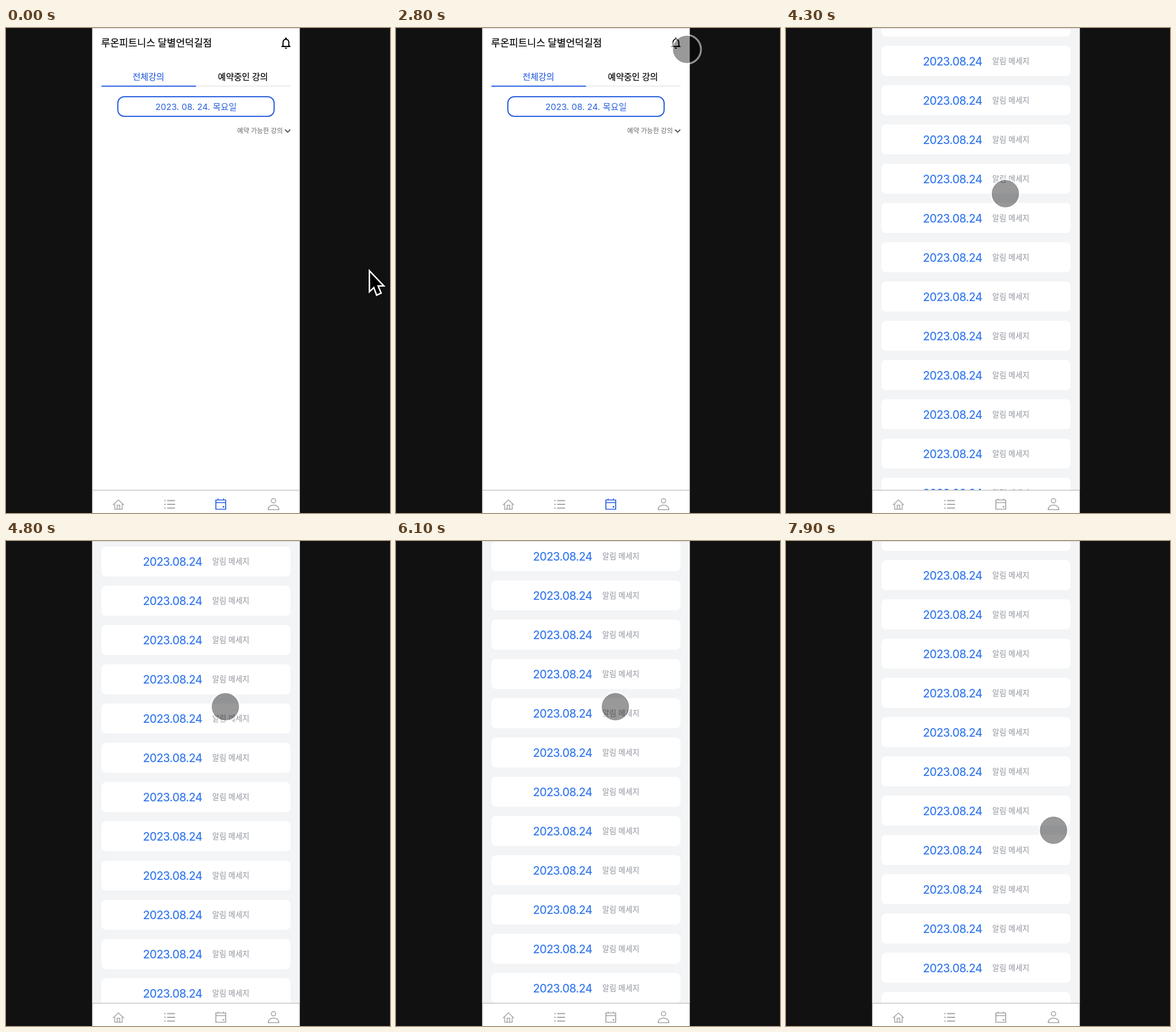
Write an HTML page that moves like this. It is 666 px wide and 840 px high and loops after 8000 ms.

```html
<!DOCTYPE html>
<html lang="ko">
<head>
<meta charset="utf-8">
<title>알림 메시지 리스트</title>
<style>
  html, body { margin: 0; width: 100%; height: 100%; overflow: hidden; background: #111; }
  svg { display: block; width: 666px; height: 840px; }
  text { font-family: Inter, "Noto Sans CJK KR", "Noto Sans CJK", sans-serif; }
  .medium { font-weight: 500; stroke: currentColor; stroke-width: .2px; }
  .line { fill: none; stroke: currentColor; }
  .arrow { filter: drop-shadow(0 2px 2px rgba(0, 0, 0, .4)); }
</style>
</head>
<body>
<svg viewBox="0 0 666 840">
  <defs>
    <clipPath id="screen"><rect x="149.5" width="360" height="800"/></clipPath>
    <g id="header">
      <path fill="#000" transform="translate(473.5 14)" d="M12 22c1.1 0 2-.9 2-2h-4c0 1.1.9 2 2 2zm6-6v-5c0-3.07-1.63-5.64-4.5-6.32V4c0-.83-.67-1.5-1.5-1.5s-1.5.67-1.5 1.5v.68C7.64 5.36 6 7.92 6 11v5l-2 2v1h16v-1l-2-2zm-2 1H8v-6c0-2.48 1.51-4.5 4-4.5s4 2.02 4 4.5v6z"/>
    </g>
  </defs>

  <rect width="666" height="840" fill="#111"/>
  <rect x="149.5" width="360" height="840" fill="#fff"/>

  <g clip-path="url(#screen)">
    <g id="booking">
      <use href="#header"/>
      <path class="line" color="#ddd" d="M165.5 100.5h328"/>
      <path class="line" color="#2a60e0" stroke-width="2" d="M165.5 100.8h164"/>
      <rect class="line" color="#2a60e0" stroke-width="2" x="194" y="119" width="271" height="34" rx="11"/>
      <path class="line" color="#555" stroke-width="1.8" d="M484 176l4.5 4.5 4.5-4.5"/>
    </g>
    <g id="alerts">
      <rect x="149.5" width="360" height="800" fill="#f2f4f6"/>
      <g id="list">
        <rect x="149.5" width="360" height="52" fill="#fff"/>
        <use href="#header"/>
        <path class="line" color="#c4c4c4" d="M149.5 52.5h360"/>
      </g>
    </g>
    <path class="line" color="#d4d4d4" d="M149.5 .5h360"/>
  </g>

  <path class="line" color="#b0b0b0" d="M149.5 800.5h360"/>
  <g class="line" color="#a6a6a6" stroke-width="1.5">
    <path d="M185.5 826.2l9.5-9 9.5 9M188.5 823.8v9.7h13v-9.7M192.7 833.5v-7h4.6v7"/>
    <path stroke-width="2" d="M274.5 818.5h2.4M279.5 818.5h13.7M274.5 825h2.4M279.5 825h13.7M274.5 831.5h2.4M279.5 831.5h13.7"/>
    <path d="M454.7 834.2c0-5 4-8 9.3-8s9.3 3 9.3 8z"/>
    <circle cx="464" cy="818.7" r="3.8"/>
  </g>
  <g id="calendar" class="line" stroke-width="1.7">
    <path d="M364 817.5h17v16h-17zM364 822h17M367.8 815v3M377.2 815v3"/>
    <circle cx="377.2" cy="829.3" r="1.5" fill="currentColor" stroke="none"/>
  </g>

  <g id="arrow" class="arrow">
    <path fill="#000" stroke="#fff" stroke-width="5" paint-order="stroke" d="M2.5 5.5V36l7-6.5 5 13.5 5.5-2.5-5.5-13h9z"/>
  </g>
  <g id="touch">
    <circle r="25" fill="none" stroke="#fff" stroke-width="3" opacity=".55"/>
    <circle r="23.5" fill="#000" opacity=".4"/>
    <circle r="23" fill="none" stroke="#777" opacity=".35"/>
  </g>
</svg>
<script>
const LOOP = 8000, STEP = 100, PAGE_AT = 3000, TOUCH_AT = 2500;
const BLUE = '#2a60e0', DATE_BLUE = '#3a7cee', GREY = '#a6a6a6';
const TAU = 385;
const $ = id => document.getElementById(id);

function add(parent, tag, attrs, content = '') {
  const el = document.createElementNS('http://www.w3.org/2000/svg', tag);
  for (const key in attrs) el.setAttribute(key, attrs[key]);
  el.textContent = content;
  parent.append(el);
  return el;
}

// Places text by its vertical centre.
function label(parent, content, x, cy, size, color, more = {}) {
  return add(parent, 'text', { x, y: cy + size * .37, 'font-size': size, fill: color, color, ...more }, content);
}

const medium = { class: 'medium' };
const centred = { class: 'medium', 'text-anchor': 'middle' };

label($('header'), '루온피트니스 달별언덕길점', 165, 26, 17, '#000', medium);
label($('booking'), '전체강의', 247, 84, 14.9, BLUE, centred);
label($('booking'), '예약중인 강의', 411, 84, 15, '#000', centred);
label($('booking'), '2023. 08. 24. 목요일', 329.5, 136, 15.1, BLUE, { 'text-anchor': 'middle' });
label($('booking'), '예약 가능한 강의', 401, 178, 11.3, '#666');

label($('list'), '알림 메시지 리스트', 165.5, 101, 15.2, '#000', medium);
for (let i = 0; i < 28; i++) {
  const y = 121 + i * 68;
  add($('list'), 'rect', { x: 165.5, y, width: 328, height: 52, rx: 8, fill: '#fff' });
  label($('list'), '2023.08.24', 237.5, y + 26.5, 19.5, DATE_BLUE,
    { 'font-weight': 500, 'letter-spacing': '-.03em' });
  label($('list'), '알림 메세지', 357.8, y + 26, 13.2, '#8f949c');
}

const arrowPath = [
  [200, 629, 418], [300, 612, 440], [400, 545, 436], [500, 455, 385], [600, 385, 290],
  [700, 363, 215], [800, 399, 184], [1000, 399, 184], [1100, 402, 176], [1300, 430, 126],
  [1500, 470, 58], [1600, 483, 38], [1700, 487, 32]
];
const touchPath = [
  [2500, 488, 38], [2800, 504, 37], [2900, 504, 37], [3000, 486, 60], [3100, 440, 150],
  [3200, 396, 250], [3300, 380.5, 287], [7200, 380.5, 287], [7300, 384, 300],
  [7500, 412, 385], [7700, 450, 470], [7900, 464, 501]
];

function along(path, t) {
  const next = path.findIndex(p => p[0] > t);
  if (next < 1) return (next ? path[path.length - 1] : path[0]).slice(1);
  const [a, b] = [path[next - 1], path[next]];
  const k = (t - a[0]) / (b[0] - a[0]);
  return [a[1] + (b[1] - a[1]) * k, a[2] + (b[2] - a[2]) * k];
}

// A swipe: the finger pushes, then momentum decays.
function swipe(u, ramp, push, glide) {
  if (u <= 0) return 0;
  if (u < ramp) return push * (u / ramp) ** 1.8;
  return push + glide * (1 - Math.exp((ramp - u) / TAU));
}

const scrollAt = t =>
  swipe(Math.min(t, 5300) - 3500, 200, 47, 140.6) + swipe(t - 5400, 300, 164.1, 488);

const move = (el, [x, y]) => el.setAttribute('transform', `translate(${x} ${y})`);
const show = (el, on) => el.setAttribute('display', on ? 'inline' : 'none');

function draw(now) {
  const t = Math.floor((now % LOOP) / STEP) * STEP;
  const alerts = t >= PAGE_AT, touching = t >= TOUCH_AT;
  show($('booking'), !alerts);
  show($('alerts'), alerts);
  show($('arrow'), !touching);
  show($('touch'), touching);
  $('calendar').setAttribute('color', alerts ? GREY : BLUE);
  move($('list'), [0, -scrollAt(t)]);
  move($('arrow'), along(arrowPath, t));
  move($('touch'), along(touchPath, t));
}

const start = performance.now();
function tick() {
  draw(performance.now() - start);
  requestAnimationFrame(tick);
}
tick();
</script>
</body>
</html>
```
